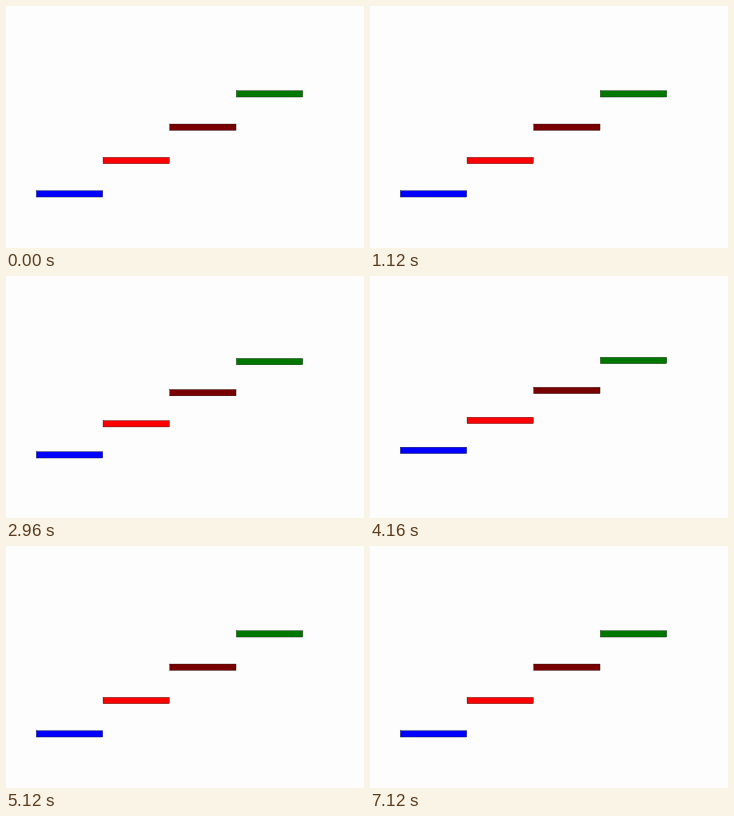
An HTML page that plays this animation: 358 px wide and 242 px high, repeating every 8000 ms.

```html
<!DOCTYPE html>
<html lang="en">
<head>
<meta charset="utf-8">
<title>Rising steps</title>
<style>
  html, body { margin: 0; width: 100%; height: 100%; overflow: hidden; background: #fdfdfd; }
  svg { display: block; }
  rect { stroke: #000; stroke-width: .33px; }
</style>
</head>
<body>
<svg width="358" height="242" viewBox="0 0 358 242"></svg>
<script>
const COLORS = ['#00f', '#f00', '#780000', '#007800'];
const WIDTH = 200 / 3, HEIGHT = 20 / 3, DROP = 100 / 3, LEFT = 30.2, TOP = 51.2;
const EDGE = 1 / 6;
const TICK = 80, CYCLE = 2000, MOVE = 500;
const STARTS = [116, 119, 108, 122]; // start of the rise in each cycle

const svg = document.querySelector('svg');
const bars = COLORS.map((color, i) => {
  const bar = document.createElementNS('http://www.w3.org/2000/svg', 'rect');
  const attrs = {
    x: LEFT + i * WIDTH + EDGE,
    width: WIDTH - 2 * EDGE,
    height: HEIGHT - 2 * EDGE,
    fill: color
  };
  for (const name in attrs) bar.setAttribute(name, attrs[name]);
  return svg.appendChild(bar);
});

// cubic-bezier(.25, .1, .25, 1), solved by bisection
function ease(x) {
  if (x <= 0) return 0;
  if (x >= 1) return 1;
  let lo = 0, hi = 1, s;
  for (let i = 0; i < 24; i++) {
    s = (lo + hi) / 2;
    if (.75 * s * (1 - s) + s ** 3 < x) lo = s; else hi = s;
  }
  return .3 * s * (1 - s) ** 2 + 3 * s * s * (1 - s) + s ** 3;
}

// 1 = spread into a staircase, 0 = level at the top
function spread(time) {
  const t = time % CYCLE - STARTS[Math.floor(time / CYCLE)];
  return t < MOVE ? 1 - ease(t / MOVE) : ease(t / MOVE - 1);
}

const begin = performance.now();

function draw(now) {
  const elapsed = Math.max(0, now - begin) % (CYCLE * STARTS.length);
  const k = spread(Math.floor(elapsed / TICK) * TICK);
  bars.forEach((bar, i) => bar.setAttribute('y', TOP + EDGE + (4 - i) * DROP * k));
  requestAnimationFrame(draw);
}
draw(begin);
</script>
</body>
</html>
```
